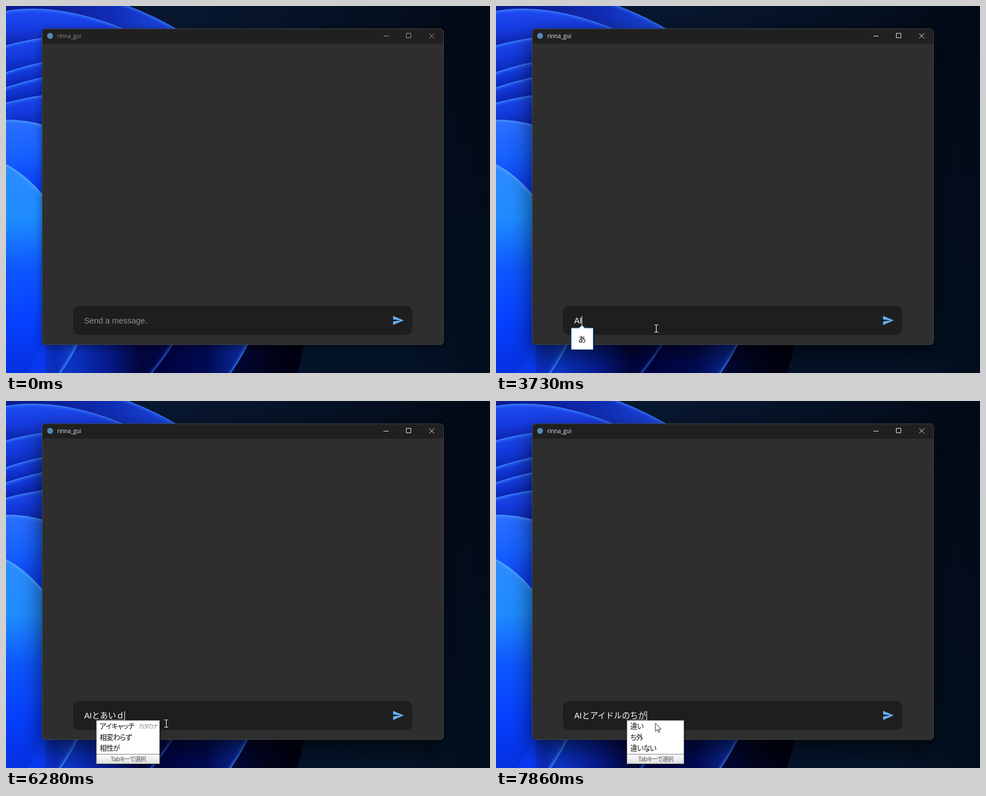
Recreate the animation shown at these times as an HTML page with a canvas. Size 859x652 px, loop 8 s.

```html
<!DOCTYPE html>
<html lang="ja">
<head>
<meta charset="utf-8">
<title>rinna_gui</title>
<style>
html, body { margin: 0; width: 100%; height: 100%; overflow: hidden; background: #030d1d; }
canvas, svg { position: absolute; left: 0; top: 0; width: 859px; height: 652px; }
text { white-space: pre; }
.title { font: 9.9px "Open Sans", "Noto Sans", sans-serif; }
.msg { font: 14.4px "Liberation Sans", "Noto Sans CJK JP", sans-serif; }
.jp { font-family: "Noto Sans CJK JP", "Noto Sans CJK", sans-serif; font-feature-settings: "palt"; }
.row { font-size: 12.6px; letter-spacing: -.7px; fill: #111; }
.note { font-size: 10.5px; letter-spacing: -1.3px; fill: #888; }
.foot { font-size: 10.5px; letter-spacing: -.7px; fill: #555; }
</style>
</head>
<body>
<canvas id="back" width="859" height="652"></canvas>
<svg id="front" viewBox="0 0 859 652"></svg>
<script>
const LOOP = 8000;
const EM = 14.4, LEFT = 138.95;
const ctx = document.getElementById('back').getContext('2d');
const front = document.getElementById('front');

function ramp(x0, y0, x1, y1, colors) {
  const g = ctx.createLinearGradient(x0, y0, x1, y1);
  colors.forEach((c, i) => g.addColorStop(i / (colors.length - 1), c));
  return g;
}

// A petal is a filled area with a glowing rim along its leading curve.
function petal(rim, rest, fill, glow) {
  ctx.fillStyle = fill;
  ctx.fill(new Path2D(rim + rest));
  const line = new Path2D(rim);
  ctx.save();
  ctx.clip(new Path2D(rim + rest));
  ctx.strokeStyle = glow;
  for (const [w, a] of [[12, .16], [7, .28], [3.5, .7]]) {
    ctx.lineWidth = w;
    ctx.globalAlpha = a;
    ctx.stroke(line);
  }
  ctx.restore();
}

function wallpaper() {
  ctx.fillStyle = ramp(300, 0, 859, 120, ['#081730', '#051124', '#020a17']);
  ctx.fillRect(0, 0, 859, 652);
  ctx.fillStyle = ramp(0, 60, 0, 652, ['rgba(4,18,38,0)', 'rgba(4,18,40,.7)', 'rgba(4,20,42,.9)']);
  ctx.fillRect(0, 0, 859, 652);
  ctx.fillStyle = ramp(700, 0, 859, 0, ['rgba(2,9,20,0)', 'rgba(2,9,20,.6)']);
  ctx.fillRect(0, 0, 859, 652);

  // Lower fan
  const fan = [
    [528, 516, 400, ['#02083a', '#01031c', '#00000c'], '#01041c'],
    [432, 398, 280, ['#000340', '#010a52', '#0c2fa8'], '#3c78e8'],
    [300, 258, 115, ['#0a34c4', '#061c90', '#01053c', '#010a50'], '#2c60dc'],
    [130, 96, 50, ['#0934d8', '#0a2cb8', '#1048dc'], '#4590ff']
  ];
  for (const [a, b, from, colors, glow] of fan)
    petal(`M${a + 3} 590Q${(a + b) / 2 + 4} 624 ${b} 654`, 'H0V590Z', ramp(from, 0, a, 0, colors), glow);

  // Upper arcs
  petal('M195 -8Q255 12 312 46', 'H0V-8Z', ramp(60, 0, 310, 0, ['#0a1c90', '#102cb4', '#1c4ce8']), '#3478ff');
  petal('M-6 10C60 -4 140 10 222 46', 'V80H-6Z', ramp(0, 5, 0, 72, ['#1f4cf4', '#163ce4', '#0c22a8']), '#3f82ff');
  const arcs = [[70, 57, 48], [118, 100, 28], [145, 127, 28], [172, 159, 46]];
  for (const [a, b, h] of arcs)
    petal(`M-4 ${a + 1}Q30 ${(a + b) / 2 - 2} 68 ${b - 1}`, 'V652H-4Z',
      ramp(0, b, 8, b + h + 12, ['#1c4cf0', '#143ce0', '#0a28b8']), '#4388ff');
  petal('M-4 202Q32 201 70 212', 'V652H-4Z', ramp(0, 205, 30, 335, ['#2b70ff', '#1660ff', '#0838f0']), '#5098ff');
  petal('M-4 279Q34 297 70 341', 'L66 602Q54 624 37 654H-4Z',
    ramp(0, 290, 30, 650, ['#2c8cff', '#1e8cff', '#0d56ff', '#0640ff', '#0530e0']), '#58a8ff');
}

function box(x, y, w, h, r, fill, stroke) {
  ctx.beginPath();
  ctx.roundRect(x, y, w, h, r);
  ctx.fillStyle = fill;
  ctx.fill();
  if (stroke) {
    ctx.strokeStyle = stroke;
    ctx.stroke();
  }
}

function drawBack(focus) {
  wallpaper();
  ctx.save();
  ctx.shadowColor = `rgba(0,0,0,${.45 + .2 * focus})`;
  ctx.shadowBlur = 16 + 24 * focus;
  ctx.shadowOffsetY = 4 + 10 * focus;
  box(64, 40, 713, 562, 7, '#2e2e2e');
  ctx.restore();
  ctx.lineWidth = 1;
  box(64.5, 40.5, 712, 561, 7, '#2e2e2e', '#434343');
  box(65, 41, 711, 26, [6, 6, 0, 0], '#202020');
  box(119, 533, 602, 51.5, 10, '#1e1e1e');
  ctx.fillStyle = '#5689b4';
  ctx.beginPath();
  ctx.arc(78.2, 53, 5.2, 0, 7);
  ctx.fill();
  ctx.strokeStyle = focus ? '#e4eaf0' : '#9a9a9a';
  ctx.stroke(new Path2D('M670 53.5H679M710.5 48.5H718.5V56.5H710.5ZM751 48.5L760 57.5M760 48.5L751 57.5'));
  ctx.save();
  ctx.translate(685.2, 547.8);
  ctx.scale(.9, .9);
  ctx.fillStyle = '#64b1f6';
  ctx.fill(new Path2D('M2 21L23 12 2 3V10L17 12 2 14Z'));
  ctx.restore();
}

// Input states: [start, text, length being composed, options]
const pop = (rows, w = 102, more) => ({ rows, w, ...more });
const off = { hide: 1 };
const idol = 'アイドル';
const steps = [
  [0, '', 0, off], [1070, '', 0], [1560, '', 0, off], [2080, '', 0],
  [2570, 'A', 0], [3140, 'A', 0, off], [3460, 'AI', 0], [3730, 'AI', 0, { badge: 1 }],
  [4000, 'AIｔ', 1], [4090, 'AIと', 1],
  [4180, 'AIと', 1, pop(['ところで', 'という', 'とりあえず'])],
  [4360, 'AIと', 0, pop(['ところで', 'という', 'とりあえず'], 102, { fade: .4 })],
  [4450, 'AIと', 0], [4920, 'AIと', 0, off], [5410, 'AIと', 0],
  [5940, 'AIとあ', 1], [6040, 'AIとあ', 1, pop(['ありがとう', 'あと', 'あなた'], 104)],
  [6190, 'AIとあい', 2, pop(['相手', '相変わらず', '間'], 104)],
  [6280, 'AIとあいｄ', 3, pop(['アイキャッチ', '相変わらず', '相性が'], 113, { note: 'カタカナ' })],
  [6460, 'AIとあいど', 3, pop([idol, '相性が', 'アイドリング'], 113)],
  [6550, 'AIとあいど', 3, pop([idol, idol + 'になりたい', idol + 'のように歌う人'], 164)],
  [6640, 'AIとあいどｒ', 4, pop([idol, idol + 'になりたい', idol + 'のように歌う人'], 164)],
  [6730, 'AIとあいどる', 4, pop([idol, idol + 'になりたい', idol + 'グループの歌'], 151)],
  [6870, 'AIとあいどるｎ', 5, pop([idol, idol + 'になりたい', idol + 'グループの歌'], 151)],
  [7060, 'AIとあいどるの', 5, pop([idol, idol + 'になりたい', idol + 'ポレミーナ'], 102, { footW: 151 })],
  [7150, 'AIとあいどるの', 5, pop([idol, idol + 'になりたい', idol + 'ポレミーナ'])],
  [7260, 'AIとアイドルの', 5],
  [7580, 'AIとアイドルのち', 1, pop(['ちょっと', '小さい', '違う'])],
  [7670, 'AIとアイドルのちｇ', 2, pop(['力', '小さい', '違う'])],
  [7860, 'AIとアイドルのちが', 2, pop(['違い', 'ち外', '違いない'])]
];

// Pointer arrives from below: [start, x, y]
const moves = [[280, 289, 636], [380, 288, 614], [480, 286, 597], [570, 285, 581], [670, 284.5, 573]];

const at = (list, t) => list.filter(s => s[0] <= t).pop();
const text = (cls, x, y, s, more = '') => `<text class="${cls}" x="${x}" y="${y}" ${more}>${s}</text>`;
const rect = (x, y, w, h, fill) => `<rect x="${x}" y="${y}" width="${w}" height="${h}" fill="${fill}"/>`;

function edge(s) {
  let x = LEFT;
  for (const c of s) x += c === 'A' ? 9.605 : c === 'I' ? 4.003 : EM;
  return x;
}

function popup(x, o) {
  const { rows, w, note, fade = 1, footW = w } = o;
  let out = `<g opacity="${fade}"><rect x="${x + 2}" y="569" width="${w}" height="78" fill="#000" opacity=".3"/>`;
  out += rect(x, 567, w, 78, '#808080') + rect(x + 1, 568, w - 2, 59, '#fff');
  out += rect(x + 1, 628, w - 2, 16, 'url(#foot)');
  rows.forEach((r, i) => out += text('jp row', x + 6.3, 582 + 19.6 * i, r));
  if (note) out += text('jp note', x + w - 4, 581.5, note, 'text-anchor="end"');
  out += `<svg x="${x}" y="628" width="${w}" height="17">` +
    text('jp foot', footW / 2 + .5, 11.6, 'Tabキーで選択', 'text-anchor="middle"') + '</svg>';
  return out + '</g>';
}

function badge() {
  return rect(134, 573, 41, 40, 'rgba(0,0,0,.3)') +
    '<path d="M133.5 572H147.5L152.5 567 157.5 572H172.5V610.5H133.5Z" fill="#fff" stroke="#1d6fb8"/>' +
    text('jp', 152.8, 596.5, 'あ', 'font-size="14" text-anchor="middle" fill="#111"');
}

function pointer(t, o) {
  const m = at(moves, t);
  if (!m) return '';
  const [, x, y] = m;
  const over = o.rows && o.x < x && x < o.x + o.w;
  if (over || y > 590)
    return `<path transform="translate(${x - 2} ${over ? 572 : y})" d="M.5 .5V14.8L3.7 11.8 6 16.8 8.3 15.8 6 11H10.5Z" fill="#fff" stroke="#222"/>`;
  const beam = 'M-3.5 -6.5H-1Q0 -6.5 0 -5.5Q0 -6.5 1 -6.5H3.5M0 -5.5V5.5M-3.5 6.5H-1Q0 6.5 0 5.5Q0 6.5 1 6.5H3.5';
  return `<path transform="translate(${x} ${y})" d="${beam}" fill="none" stroke="#f0f0f0" stroke-width="1.1"/>`;
}

function drawFront(t, focus) {
  const [, s, n, opt = {}] = at(steps, t);
  const o = { ...opt };
  const start = edge(s.slice(0, s.length - n));
  const end = edge(s);
  o.x = Math.floor(o.fade ? edge('AI') : start) - 6;
  let out = '<defs><linearGradient id="foot" x2="0" y2="1"><stop stop-color="#fff"/><stop offset="1" stop-color="#dedede"/></linearGradient></defs>';
  out += text('title', 91, 56.8, 'rinna_gui', `fill="${focus ? '#e2edf5' : '#8e8e8e'}"`);
  out += s ? text('msg', LEFT - .3, 564, s, 'fill="#fff"')
           : text('msg', LEFT - .3, 564, 'Send a message.', 'fill="#919191"');
  if (n) {
    const dash = o.rows || s.length < 5 ? 'stroke-dasharray="1 1"' : '';
    out += `<path d="M${Math.floor(start)} 566.5H${Math.floor(end)}" stroke="#ddd" ${dash}/>`;
  }
  if (!o.hide) out += rect(Math.floor(end), 551, 1, 16, '#fff');
  if (o.badge) out += badge();
  if (o.rows) out += popup(o.x, o);
  return out + pointer(t, o);
}

let shownFocus = -1, shown = '';
function show(t) {
  const focus = t < 940 ? 0 : t < 1070 ? .5 : 1;
  if (focus !== shownFocus) drawBack(shownFocus = focus);
  const next = drawFront(t, focus);
  if (next !== shown) front.innerHTML = shown = next;
}

const begin = performance.now();
function tick() {
  show((performance.now() - begin) % LOOP);
  requestAnimationFrame(tick);
}
tick();
</script>
</body>
</html>
```
